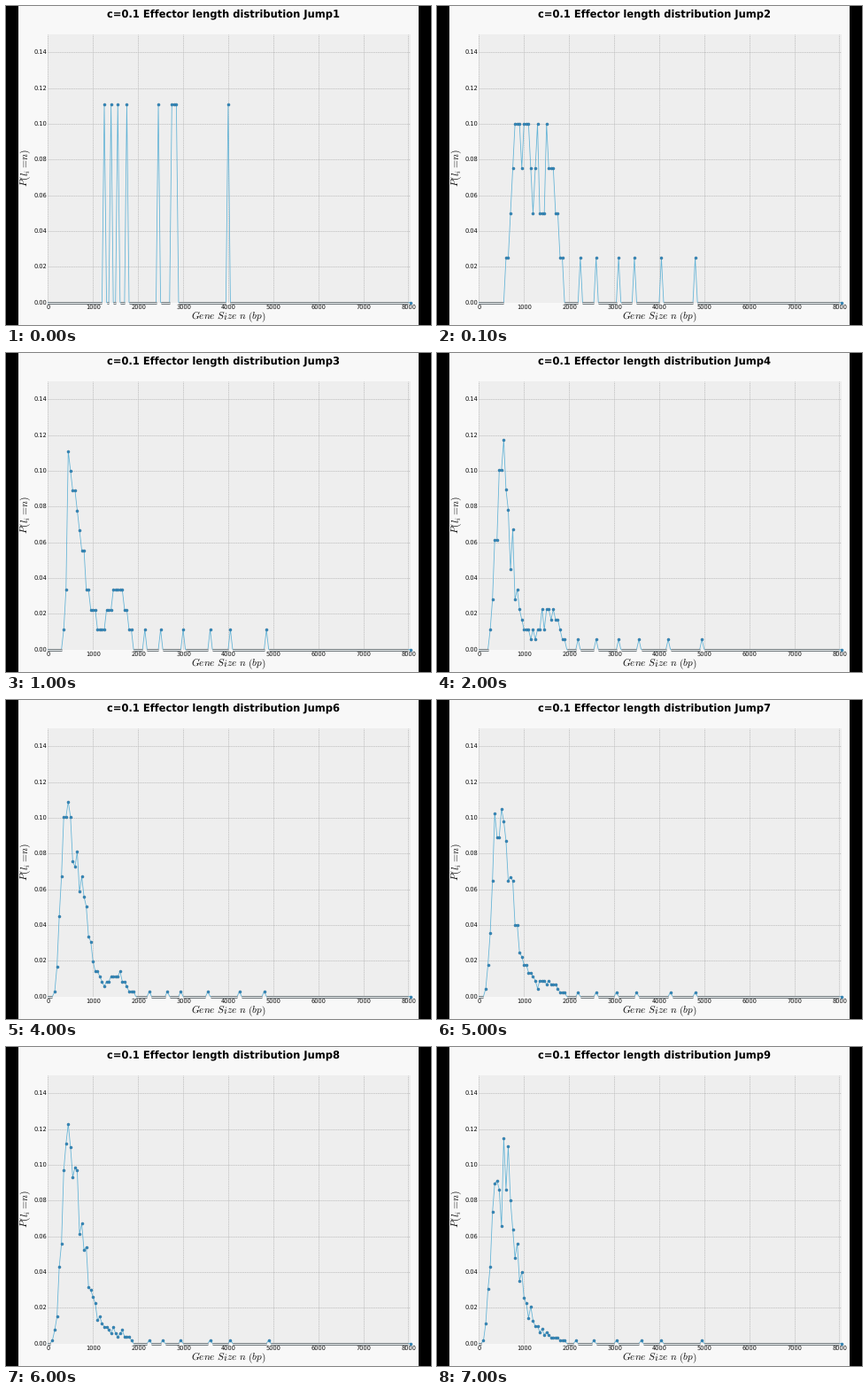
A matplotlib script that plays this animation: 480 by 360 pixels, repeating every 8 s.

```python
import numpy as np
import matplotlib.pyplot as plt
from matplotlib.animation import FuncAnimation

plt.rcParams["mathtext.fontset"] = "cm"
plt.rcParams["font.family"] = "DejaVu Sans"
plt.rcParams["text.hinting"] = "none"

BIN = 50            # bp per histogram bin
MAX_SIZE = 8050
PX_PER_BP = 407 / 8000
PX_PER_P = 2016
LEFT, BASE = 47.4, 334.5
LINE, DOT, INK = "#62b3d6", "#348abd", "#0c0c0c"
FOUNDERS = [1250, 1400, 1550, 1750, 2450, 2750, 2800, 2850, 4000]

sizes = np.arange(0, MAX_SIZE + BIN, BIN)


def to_bins(values):
    return np.rint(np.asarray(values) / BIN).astype(int)


def distribution(jump):
    """Share of genes per size bin after the given jump."""
    p = np.zeros(len(sizes))
    if jump == 1:
        p[to_bins(FOUNDERS)] = 1 / len(FOUNDERS)
        return p

    rng = np.random.default_rng(jump)
    age = jump - 3
    genes = max(40, round(89.5 * (age + 1)))

    # A steep rise to the mode, a slower decay and a fading second hump.
    start = 250 * np.exp(-0.5 * age)
    mode = 450 + 100 * np.exp(-1.5 * age)
    t = np.clip((sizes - start) / (mode - start), 0, None)
    p = 0.1 * (t * np.exp(1 - t)) ** np.where(t < 1, 5, 3)
    hump = 0.035 * np.exp(-0.4 * age)
    p += hump * np.exp(-((sizes - 1550) / 180) ** 2 / 2)
    p *= rng.normal(1, 0.16, len(sizes)).clip(0)
    p[sizes > 2050] = 0

    counts = np.rint(p * genes)
    tail = 2200 * 1.17 ** np.arange(6) * rng.uniform(0.97, 1.03, 6)
    counts[to_bins(tail)] = 1
    return counts / genes


shares = [distribution(jump) for jump in range(1, 10)]

fig = plt.figure(figsize=(480 / 72, 360 / 72), dpi=72, facecolor="black")

stage = fig.add_axes([0, 0, 1, 1])
stage.set(xlim=(0, 480), ylim=(360, 0))
stage.axis("off")
stage.add_patch(plt.Rectangle((14, 0), 452, 360, color="#f8f8f8", lw=0))

ax = fig.add_axes([LEFT / 480, 1 - BASE / 360, MAX_SIZE * PX_PER_BP / 480,
                   0.15 * PX_PER_P / 360], facecolor="#eeeeee")
ax.set(xlim=(0, MAX_SIZE), ylim=(0, 0.15), xticks=[], yticks=[])
ax.spines[:].set_visible(False)

grid = dict(color="#bababa", lw=0.75, dashes=(1.6, 1), zorder=0.5)
for size in range(0, 8001, 1000):
    ax.axvline(size, **grid)
    stage.text(48 + size * PX_PER_BP, 341.7, str(size), size=6.6,
               ha="center", va="baseline", color=INK)
for p in np.arange(0, 0.15, 0.02):
    ax.axhline(p, **grid)
    stage.text(46.7, BASE - p * PX_PER_P + 2, f"{p:.2f}", size=6.6,
               ha="right", va="baseline", color=INK)

stage.text(251, 351, r"$Gene\ Size\ n\ (bp)$", size=11.3,
           ha="center", va="center", color=INK)
stage.text(22.5, 183, r"$P(l_i=\!n)$", size=11.7, rotation=90,
           ha="center", va="center", color=INK)
title = stage.text(245, 12.4, "", size=11.55, weight="bold",
                   ha="center", va="baseline")

curve, = ax.plot([], [], color=LINE, lw=0.8, clip_on=False, zorder=2)
flat = dict(clip_on=False, solid_capstyle="butt")
flat_edge, = ax.plot([], [], color="#747c80", lw=3, zorder=3, **flat)
flat_core, = ax.plot([], [], color="#e6eaec", lw=1, zorder=3.1, **flat)
dots, = ax.plot([], [], "o", ms=3, mfc=DOT, mec="#2c7099", mew=0.5,
                clip_on=False, zorder=4)


def draw(frame):
    # The first jump only flashes up; every later one holds to the full second.
    jump = 1 if frame == 0 else 2 + frame // 10
    p = shares[jump - 1]
    title.set_text(f"c=0.1 Effector length distribution Jump{jump}")
    curve.set_data(sizes, p)
    baseline = np.where((p == 0) & (sizes <= 8000), 0, np.nan)
    flat_edge.set_data(sizes, baseline)
    flat_core.set_data(sizes, baseline)
    shown = (p > 0) | (sizes == MAX_SIZE)
    dots.set_data(sizes[shown], p[shown])
    return title, curve, flat_edge, flat_core, dots


anim = FuncAnimation(fig, draw, frames=80, interval=100, repeat=True,
                     repeat_delay=0)
plt.show()
```
